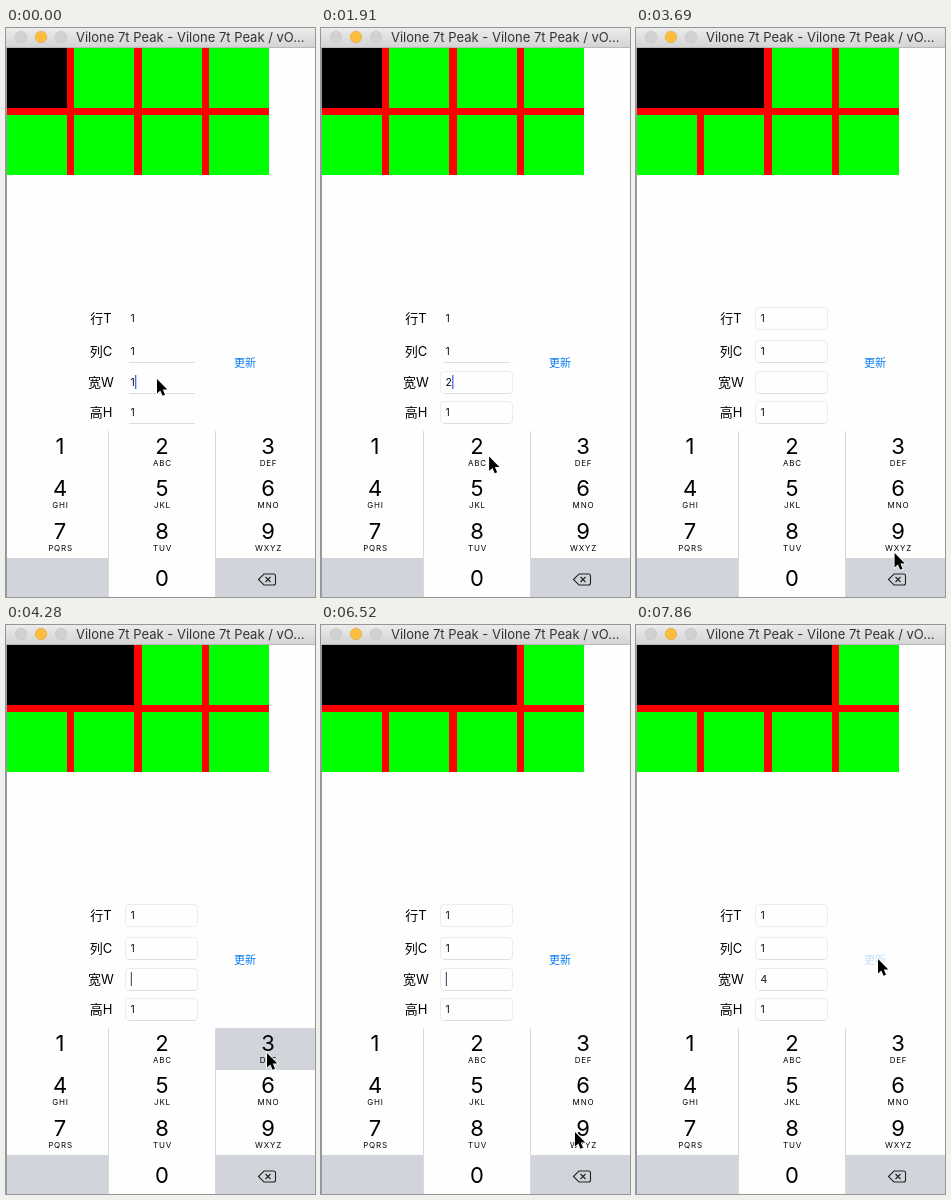
These frames come from a looping animation (309x569 px, 8 s). An HTML page:

```html
<!DOCTYPE html>
<html lang="zh">
<head>
<meta charset="utf-8">
<style>
html, body { margin: 0; width: 100%; height: 100%; overflow: hidden; background: #fff; }
svg { display: block; font-family: Inter, "Noto Sans CJK SC", "Noto Sans CJK", sans-serif; }
.mid { text-anchor: middle; }
.grid, #pad rect { shape-rendering: crispEdges; }
.light { fill: #d1d1d1; stroke: #c4c4c4; stroke-width: .6; }
.field { fill: #fefefe; stroke: #ececec; }
#cursor { stroke: #fff; stroke-width: 1.6; paint-order: stroke; }
</style>
</head>
<body>
<svg width="309" height="569" viewBox="0 0 309 569">
  <defs>
    <linearGradient id="bar" x2="0" y2="1">
      <stop stop-color="#ebebeb"/><stop offset="1" stop-color="#d3d3d3"/>
    </linearGradient>
  </defs>
  <rect width="309" height="569" fill="#fefefe"/>
  <rect width="309" height="20" fill="url(#bar)"/>
  <rect y="19" width="309" height="1" fill="#b9b9b9"/>
  <circle cx="15" cy="9" r="5.7" class="light"/>
  <circle cx="35" cy="9" r="5.7" fill="#fdbd3e" stroke="#dfa236" stroke-width=".6"/>
  <circle cx="55" cy="9" r="5.7" class="light"/>
  <text x="70" y="14" font-size="13" fill="#333">Vilone 7t Peak - Vilone 7t Peak / vO...</text>
  <g class="grid">
    <rect x="1" y="20" width="262" height="127" fill="#f00"/>
    <g id="cells" fill="#0f0"></g>
    <rect id="block" x="1" y="20" height="60"/>
  </g>
  <g id="form"></g>
  <rect id="caret" y="347" width="1.2" height="14"/>
  <text id="update" x="239" y="339" class="mid" font-size="11" fill="#0a7cf5">更新</text>
  <g id="pad"></g>
  <g fill="none" stroke="#222" stroke-width="1.1">
    <path d="M252.500 551.500L258 546H267.500Q269.500 546 269.500 548V555Q269.500 557 267.500 557H258Z"/>
    <path d="M259.500 549l5 5m0-5l-5 5"/>
  </g>
  <path d="M.5 20V569" stroke="#9a9aa2"/>
  <path id="cursor" d="M0 0V14.500L3.300 11.500L5.600 16.700L8 15.700L5.800 10.500H10.300Z"/>
</svg>
<script>
const LOOP = 8000, LEAD = 270, STEP = 148.24;
const TAP = 140, PITCH = 67.33, CELL = 60;
const $ = id => document.getElementById(id);

function add(parent, tag, attrs, text = '') {
  const el = document.createElementNS('http://www.w3.org/2000/svg', tag);
  set(el, attrs);
  el.textContent = text;
  return parent.appendChild(el);
}

function set(el, attrs) {
  for (const key in attrs) el.setAttribute(key, attrs[key]);
}

const show = on => on ? 'visible' : 'hidden';

for (let i = 0; i < 8; i++)
  add($('cells'), 'rect', {
    x: Math.round(1 + PITCH * (i % 4)), y: i < 4 ? 20 : 87, width: CELL, height: CELL
  });

const fields = [['行T', 290], ['列C', 322.5], ['宽W', 354], ['高H', 384]].map(([label, y], i) => {
  const form = $('form'), top = Math.round(y - 11) + .5;
  add(form, 'text', { x: 95, y: y + 5, class: 'mid', 'font-size': 13 }, label);
  const box = add(form, 'rect', { x: 119.5, y: top, width: 72, height: 22, rx: 3.5, class: 'field' });
  if (i) add(form, 'path', { d: `M123 ${top + 22}H189`, stroke: '#dedede' });
  const value = add(form, 'text', { x: 124.5, y: y + 4, 'font-size': 10.5, fill: '#111' }, '1');
  return { box, value };
});

const cols = [1, 103, 210, 309], centers = [54, 156, 262];
const letters = ',ABC,DEF,GHI,JKL,MNO,PQRS,TUV,WXYZ,,,'.split(',');
const keys = [...'123456789', '', '0', 'del'].map((name, i) => {
  const pad = $('pad'), c = i % 3, y = Math.round(403 + 42.4 * Math.floor(i / 3));
  const face = add(pad, 'rect', { x: cols[c], y, width: cols[c + 1] - cols[c], height: 43 });
  if (name !== 'del')
    add(pad, 'text', { x: centers[c], y: y + (i < 9 ? 22.5 : 28), class: 'mid', 'font-size': 22 }, name);
  add(pad, 'text', {
    x: centers[c] + .5, y: y + 34.5, class: 'mid', 'font-size': 8, 'letter-spacing': .8
  }, letters[i]);
  return { name, face, grey: i === 9 || i === 11 };
});
add($('pad'), 'path', { d: 'M102.5 403V569M209.5 403V569', stroke: '#d9dadd' });

// Where the pointer stops and what it presses there
const stops = [
  { at: 0, x: 151, y: 351 },
  { at: 890, x: 258, y: 548, key: 'del' },
  { at: 1630, x: 165, y: 433, key: '2' },
  { at: 2650, x: 232, y: 338, key: 'update' },
  { at: 3390, x: 258, y: 548, key: 'del' },
  { at: 4250, x: 261, y: 428, key: '3' },
  { at: 5330, x: 234, y: 332, key: 'update' },
  { at: 6370, x: 259, y: 541, key: 'del' },
  { at: 6520, x: 254, y: 507 },
  { at: 6970, x: 56, y: 468, key: '4' },
  { at: 7840, x: 242, y: 334, key: 'update' }
];

// Rest after a press, travel, then settle before the next one
function pointer(t) {
  const i = stops.findLastIndex(s => s.at <= t);
  const a = stops[i], b = stops[i + 1] || a;
  const part = (t - a.at) / (b.at - a.at || 1);
  const u = a === b ? 0 : Math.min(1, Math.max(0, (part - .27) / .53));
  return [a.x + (b.x - a.x) * u, a.y + (b.y - a.y) * u];
}

// Replay every press so far: erase on touch, type and update on release
function stateAt(t) {
  const s = { value: '1', width: 1, fade: 1, down: null };
  for (const { at, key } of stops) {
    const age = t - at;
    if (!key || age < 0) continue;
    if (age < TAP) s.down = key;
    if (key === 'update') {
      s.fade = Math.min(1, .2 + age / 700);
      if (age >= TAP) s.width = +s.value;
    } else if (key === 'del') s.value = '';
    else if (age >= TAP) s.value = key;
  }
  return s;
}

function draw(now) {
  const real = now % LOOP;
  const t = real < 300 ? 0 : 300 + STEP * Math.floor((real - LEAD) / STEP);
  const { value, width, fade, down } = stateAt(t);
  const input = fields[2].value;

  input.textContent = value;
  fields.forEach((f, i) => set(f.box, { visibility: show(t > (i < 2 ? 2600 : 1450)) }));
  set($('block'), { width: Math.round(PITCH * (width - 1)) + CELL });
  set($('update'), { opacity: fade });
  set($('caret'), {
    x: 124.8 + (value ? input.getComputedTextLength() : 0),
    fill: value ? '#4059e0' : '#555b70',
    visibility: show((t + 130) % 1000 < 670)
  });
  for (const k of keys)
    set(k.face, { fill: k.grey !== (k.name === down) ? '#d1d4da' : '#fefefe' });
  set($('cursor'), { transform: `translate(${pointer(t)})` });
  requestAnimationFrame(draw);
}
requestAnimationFrame(draw);
</script>
</body>
</html>
```
